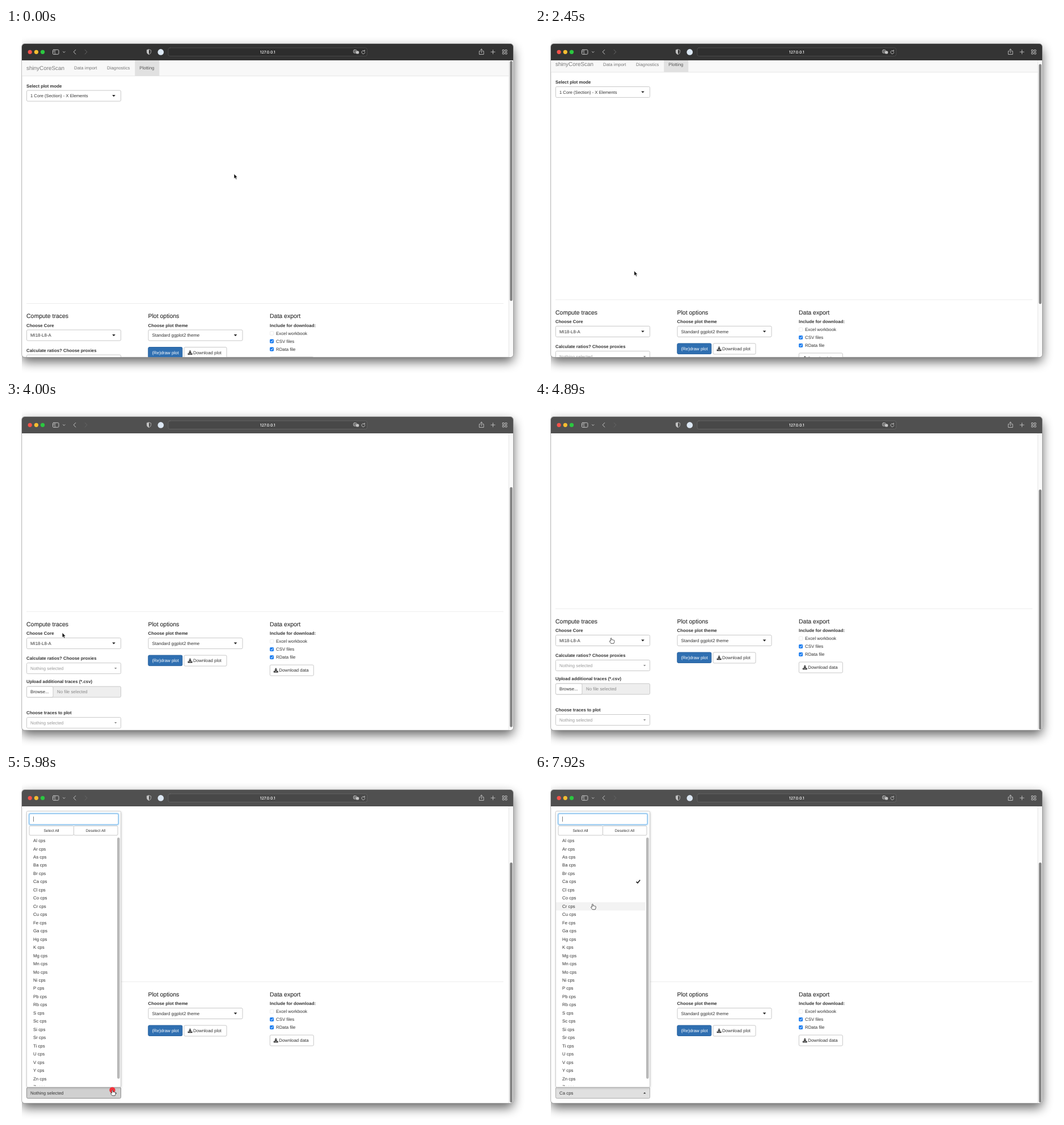
Recreate the animation shown at these times as an HTML page. Size 922 px wide and 608 px high, loop 8 s.

```html
<!DOCTYPE html>
<html lang="en">
<head>
<meta charset="utf-8">
<title>Plotting</title>
<style>
  html, body { margin: 0; width: 100%; height: 100%; overflow: hidden; background: #fff; }
  svg { display: block; width: 100vw; height: 100vh; }
  text { font: 7.85px "Liberation Sans", Arial, sans-serif; fill: #333; text-rendering: geometricPrecision; }
  .label { font-weight: 700; font-size: 7.8px; }
  .title { font-size: 10.5px; stroke: #333; stroke-width: .15px; }
  .small { font-size: 6.6px; }
  .muted { fill: #999; }
  .nav { fill: #777; }
</style>
</head>
<body>
<svg id="stage" viewBox="0 0 922 608" xmlns="http://www.w3.org/2000/svg">
  <defs>
    <filter id="blur" x="-10%" y="-15%" width="120%" height="130%"><feGaussianBlur stdDeviation="9.5"/></filter>
    <filter id="soft" x="-10%" y="-5%" width="120%" height="110%"><feGaussianBlur stdDeviation="2"/></filter>
    <clipPath id="rightOfEdge"><rect x="28" width="894" height="608"/></clipPath>
    <clipPath id="window"><rect x="28" y="28" width="866" height="552" rx="5"/></clipPath>
    <clipPath id="listArea"><rect x="37" y="109" width="165" height="441"/></clipPath>
  </defs>
  <g clip-path="url(#rightOfEdge)">
    <rect x="28" y="36" width="866" height="552" rx="6" filter="url(#blur)" opacity=".62"/>
  </g>
  <rect x="27.7" y="27.7" width="866.6" height="552.6" rx="5" fill="#fff" stroke="#777" stroke-width=".6"/>
  <g clip-path="url(#window)">
    <g id="page"></g>
    <rect x="886.5" y="57" width="8" height="523" fill="#fafafa"/>
    <path d="M886.5 57V580" stroke="#e6e6e6"/>
    <rect id="thumb" x="888.3" y="58" width="4.6" height="423" rx="2.3" fill="#858585"/>
    <g id="menu"></g>
    <rect id="toolbar" x="28" y="28" width="866" height="29"/>
    <g id="chrome" fill="none" stroke="#c6c6c6" stroke-linecap="round" stroke-linejoin="round"></g>
  </g>
  <circle id="click" r="5.2" fill="#f2333c"/>
  <g id="pointer">
    <path id="arrow" d="M0 0V8.6L2 6.8L3.4 9.9L4.9 9.2L3.5 6.2H6Z" fill="#000" stroke="#fff" stroke-width=".7"/>
    <path id="hand" d="M-.9 5.8V.8Q0-.5.9.8V3.4Q2 2.7 2.6 3.6Q3.6 3 4.2 4Q5.4 3.5 5.7 4.8V7L4.7 9.8H-.2L-2.9 6.3Q-2.9 4.9-1.7 5.1Z" fill="#fff" stroke="#222" stroke-width=".75" stroke-linejoin="round"/>
  </g>
</svg>
<script>
const $ = id => document.getElementById(id);

function add(parent, tag, attrs, content) {
  const node = document.createElementNS("http://www.w3.org/2000/svg", tag);
  for (const key in attrs) node.setAttribute(key, attrs[key]);
  if (content) node.textContent = content;
  return parent.appendChild(node);
}
const write = (parent, x, y, content, cls = "", more = {}) =>
  add(parent, "text", { x, y, class: cls, ...more }, content);
const box = (parent, x, y, width, height, fill = "#fff", stroke = "#c8c8c8", rx = 2) =>
  add(parent, "rect", { x, y, width, height, rx, fill, stroke });
const line = (parent, d, more = {}) => add(parent, "path", { d, ...more });
const show = (node, on) => node.setAttribute("visibility", on ? "visible" : "hidden");

// Page content, laid out at scroll position 0
const page = $("page");

function select(x, y, content) {
  box(page, x + .5, y - 9.5, 166, 19);
  write(page, x + 7, y + 2.8, content, "", content[0] === "1" ? { style: "font-size:7.65px" } : {});
  line(page, `M${x + 151.2} ${y - 1.5}h5.6l-2.8 3.2Z`, { fill: "#222" });
}
function picker(y) {
  const frame = box(page, 36.5, y - 9.5, 166, 19);
  const label = write(page, 43, y + 2.8, "Nothing selected", "muted");
  const caret = line(page, `M191 ${y - 1}h4.4l-2.2 2.4Z`, { fill: "#888" });
  return { y, frame, label, caret };
}
function downloadButton(x, y, width, content) {
  box(page, x + .5, y - 9.5, width, 19);
  line(page, `M${x + 10} ${y - 3.8}h2v3h2l-3 3l-3-3h2ZM${x + 7} ${y + 1.2}h2l2 1.6l2-1.6h2v2.6h-8Z`, { fill: "#333" });
  write(page, x + 16.5, y + 2.8, content);
}

add(page, "rect", { x: 28, y: 57, width: 859, height: 27.5, fill: "#f8f8f8" });
line(page, "M28 84.5H887", { stroke: "#e7e7e7" });
add(page, "rect", { x: 227.3, y: 57, width: 43, height: 27.5, fill: "#e1e1e1" });
write(page, 36, 74, "shinyCoreScan", "nav", { style: "font-size:9.9px" });
write(page, 120, 73.4, "Data import", "nav");
write(page, 178, 73.4, "Diagnostics", "nav");
write(page, 235.3, 73.4, "Plotting", "", { style: "fill:#555" });

write(page, 36, 104.6, "Select plot mode", "label");
select(36, 119.5, "1 Core (Section) - X Elements");
line(page, "M36 485.5H877", { stroke: "#ececec" });

write(page, 36, 511.3, "Compute traces", "title");
write(page, 36, 526.8, "Choose Core", "label");
select(36, 541.5, "MI18-L8-A");
write(page, 36, 570.8, "Calculate ratios? Choose proxies", "label");
const ratios = picker(585.5);
write(page, 36, 611.8, "Upload additional traces (*.csv)", "label");
box(page, 36.5, 617.5, 166, 19, "#eee");
box(page, 36.5, 617.5, 46.5, 19);
write(page, 43, 629.4, "Browse...");
write(page, 90, 629.4, "No file selected", "", { style: "fill:#888" });
write(page, 36, 666.8, "Choose traces to plot", "label");
const traces = picker(681.5);

write(page, 250.5, 511.3, "Plot options", "title");
write(page, 250.5, 526.8, "Choose plot theme", "label");
select(250.5, 541.5, "Standard ggplot2 theme");
box(page, 250.8, 562.5, 60, 18.5, "#2f6fb1", "#2a639f");
write(page, 257.5, 574.8, "(Re)draw plot", "", { style: "fill:#fff" });
downloadButton(313.5, 572, 75, "Download plot");

write(page, 465, 511.3, "Data export", "title");
write(page, 465, 526.8, "Include for download:", "label");
["Excel workbook", "CSV files", "RData file"].forEach((name, i) => {
  const y = 538 + 14 * i;
  box(page, 465.4, y - 3.2, 6.4, 6.4, i ? "#1479f0" : "#fff", i ? "#1479f0" : "#ddd", 1.3).setAttribute("stroke-width", .6);
  if (i) line(page, `M467 ${y}l1.3 1.6l2.2-3.4`, { fill: "none", stroke: "#fff" });
  write(page, 476, y + 2.8, name);
});
downloadButton(464.8, 589, 77, "Download data");

// Drop-down list
const menu = $("menu"), rowHeight = 14.466, firstRow = 117.5;
add(menu, "rect", { x: 37, y: 67, width: 166, height: 486, fill: "#000", opacity: .22, filter: "url(#soft)" });
box(menu, 36.5, 65.5, 166, 486.5, "#fff", "#ccc");
const glow = box(menu, 40, 69, 159, 21, "none", "#cfe6f8", 3);
glow.setAttribute("stroke-width", 2);
const search = box(menu, 41, 70, 157, 19);
const caret = line(menu, "M48.5 75V84", { stroke: "#444", "stroke-width": .7 });
box(menu, 41, 91.5, 78.5, 16.5);
box(menu, 119.5, 91.5, 77.5, 16.5);
write(menu, 80, 102, "Select All", "small", { "text-anchor": "middle" });
write(menu, 158, 102, "Deselect All", "small", { "text-anchor": "middle" });
const list = add(menu, "g", { "clip-path": "url(#listArea)" });
const hover = add(list, "rect", { x: 37, width: 157.5, height: rowHeight, fill: "#f3f3f3" });
const elements = "Al Ar As Ba Br Ca Cl Co Cr Cu Fe Ga Hg K Mg Mn Mo Ni P Pb Rb S Sc Si Sr Ti U V Y Zn Zr".split(" ");
elements.forEach((name, i) => write(list, 48, firstRow + 2.6 + rowHeight * i, name + " cps"));
const tick = line(list, "M178.5 189.8L181 192L185.2 186.8", { fill: "none", stroke: "#222", "stroke-width": 1.7 });
add(menu, "rect", { x: 196, y: 112, width: 4.6, height: 425, rx: 2.3, fill: "#b9b9b9" });

// Browser toolbar
const chrome = $("chrome");
["#f4524a", "#f6bd30", "#2bc840"].forEach((fill, i) =>
  add(chrome, "circle", { cx: 42.2 + 11.2 * i, cy: 42.3, r: 3.6, fill, stroke: "none" }));
box(chrome, 82.5, 38.3, 10.5, 8, "none", "#c6c6c6", 1.5);
line(chrome, "M86.3 38.5V46M84 40.5h.8M84 42.3h.8", { "stroke-width": .8 });
line(chrome, "M100.6 41.6l1.7 1.7l1.7-1.7M122.8 38.4l-3.6 3.8l3.6 3.8");
line(chrome, "M139.2 38.4l3.6 3.8l-3.6 3.8", { stroke: "#666" });
line(chrome, "M252 37.8l3.6 1.2v3.2q0 3-3.6 4.5q-3.6-1.5-3.6-4.5V39Z", { "stroke-width": .8 });
line(chrome, "M252 37.8v8.9q-3.6-1.5-3.6-4.5V39Z", { fill: "#c6c6c6", stroke: "none" });
add(chrome, "circle", { cx: 272.8, cy: 42.4, r: 5.3, fill: "#dce7f3", stroke: "none" });
add(chrome, "rect", { x: 286, y: 35, width: 350.5, height: 14.5, rx: 3, fill: "#000", "fill-opacity": .1, stroke: "#fff", "stroke-opacity": .12 });
write(chrome, 461.2, 45, "127.0.0.1", "", { "text-anchor": "middle", style: "font:500 6.9px Inter,sans-serif;fill:#fff;stroke:none" });
box(chrome, 612.6, 38.6, 5.6, 5.4, "none", "#c6c6c6", 1.6);
box(chrome, 617, 40.6, 5.2, 5, "#c6c6c6", "none", 1.6);
line(chrome, "M614 42.8l1.4-3l1.4 3M614.5 41.8h1.8", { "stroke-width": .6 });
line(chrome, "M632.3 41A2.9 2.9 0 1 0 632.8 43M630.4 40.8h2v-2", { "stroke-width": .9 });
line(chrome, "M836.3 40.7h-2v5.8h7.8v-5.8h-2M838.2 43.8v-6.6M836.4 38.8l1.8-1.8l1.8 1.8M855 42.2h7M858.5 38.7v7", { "stroke-width": .9 });
for (const x of [875.3, 880.1]) for (const y of [38.5, 43.2]) box(chrome, x, y, 3.1, 2.9, "none", "#c6c6c6", .5).setAttribute("stroke-width", .9);

// The picture refreshes in bursts: [start, end, number of steps]
const bursts = [[350, 1320, 10], [1400, 2170, 7], [2450, 3460, 10], [3530, 4150, 5], [4430, 4580, 2],
  [4890, 5780, 6], [5980, 6250, 3], [6520, 7220, 6], [7570, 7920, 4]];
// Pointer tip: [time, x, y]
const path = [[0, 402, 257], [350, 397, 253], [700, 240, 185], [1000, 80, 115], [1130, 46, 94], [1320, 77.5, 100],
  [1400, 74, 103], [1570, 54, 150], [1830, 88, 300], [2170, 174.8, 428], [2450, 174.8, 428], [2670, 165.5, 433.5],
  [3000, 110, 426], [3460, 64, 421], [3800, 78, 405], [4150, 116, 411], [4430, 122, 413], [4580, 134.2, 417.5],
  [4890, 134.2, 417.5], [5300, 152, 478], [5780, 187.5, 557], [6250, 187.5, 557], [6520, 180, 522], [7000, 120, 255],
  [7220, 98, 187], [7680, 98, 187], [7920, 101.5, 229]];
const scrolls = [[0, 0], [2449, 0], [2450, 6.6], [2560, 60], [2670, 114.4], [4889, 114.4], [4890, 119.5]];

function stepped(t) {
  let shown = 0;
  for (const [start, end, count] of bursts) {
    if (t < start) break;
    const gap = (end - start) / (count - 1);
    shown = Math.min(end, start + Math.floor((t - start) / gap + 1e-6) * gap);
  }
  return shown;
}
function at(track, t, column = 1) {
  const i = track.findIndex(key => key[0] > t);
  if (i < 0) return track[track.length - 1][column];
  const a = track[i - 1], b = track[i];
  return a[column] + (b[column] - a[column]) * (t - a[0]) / (b[0] - a[0]);
}
const within = (t, a, b) => t >= a && t < b;

function paintPicker(p, fill, stroke, color, content = "Nothing selected") {
  p.frame.setAttribute("fill", fill);
  p.frame.setAttribute("stroke", stroke);
  p.label.style.fill = color;
  p.label.textContent = content;
}

function draw(time) {
  const t = stepped(time), x = at(path, t), y = at(path, t, 2), scroll = at(scrolls, t);
  const open = time >= 5980, chosen = time >= 7650;
  const over = py => x > 36 && x < 203 && Math.abs(y + scroll - py) < 9.7;

  page.setAttribute("transform", `translate(0 ${-scroll})`);
  $("thumb").setAttribute("y", 58 + scroll * .82);
  const gray = Math.round(50 + 30 * Math.min(1, Math.max(0, scroll - 4) / 40));
  $("toolbar").setAttribute("fill", `rgb(${gray},${gray},${gray})`);

  for (const p of [ratios, traces])
    paintPicker(p, over(p.y) ? "#e6e6e6" : "#fff", over(p.y) ? "#adadad" : "#c8c8c8", "#999");
  if (open) paintPicker(traces, over(traces.y) ? "#d0d0d0" : "#e0e0e0", over(traces.y) ? "#8c8c8c" : "#adadad",
    "#333", chosen ? "Ca cps" : "Nothing selected");
  traces.caret.setAttribute("d", open ? "M191 682.8h4.4l-2.2-2.4Z" : "M191 680.5h4.4l-2.2 2.4Z");
  traces.caret.setAttribute("fill", open ? "#222" : "#888");

  const focused = !within(time, 7570, 7650);
  const row = Math.round((y - firstRow) / rowHeight);
  show(menu, open);
  for (const [node, on] of [[glow, focused], [caret, focused && !within(time, 6520, 7050)],
    [tick, chosen], [hover, row >= 0 && row < elements.length && y < 550]])
    node.setAttribute("opacity", on ? 1 : 0);
  search.setAttribute("stroke", focused ? "#66afe9" : "#c8c8c8");
  hover.setAttribute("y", firstRow + rowHeight * (row - .5));

  const pointing = open || [119.5, 541.5, ratios.y, 626.5, traces.y].some(over);
  $("pointer").setAttribute("transform", `translate(${x} ${y})`);
  show($("hand"), pointing);
  show($("arrow"), !pointing);
  $("click").setAttribute("cx", x);
  $("click").setAttribute("cy", y);
  show($("click"), within(time, 5980, 6100) || within(time, 7570, 7680));
}

const began = performance.now();
function tickFrame() {
  draw((performance.now() - began) % 8000);
  requestAnimationFrame(tickFrame);
}
tickFrame();
</script>
</body>
</html>
```
